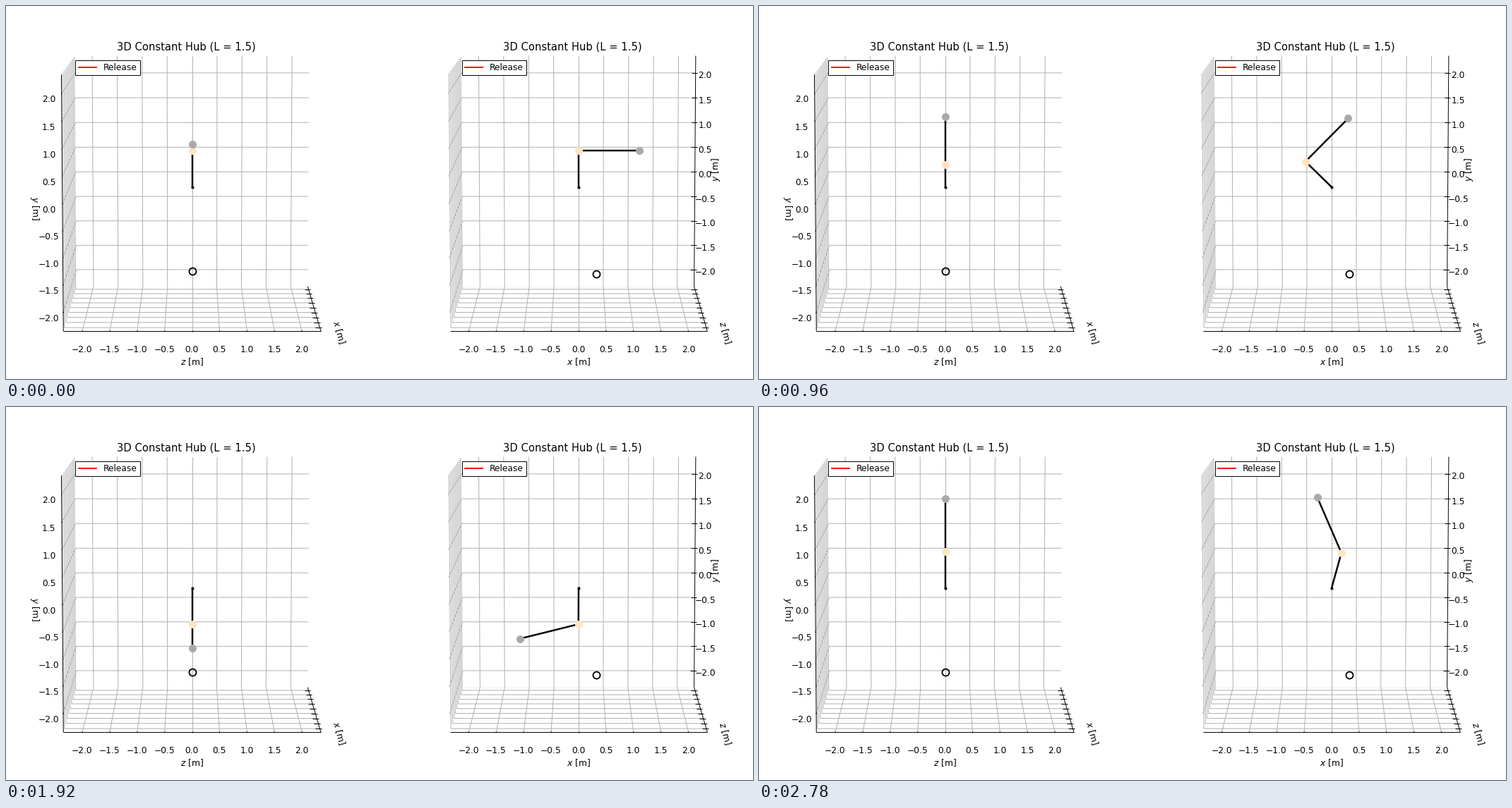
A matplotlib script for the animation above (2800 ms loop, 1058x529 px).

```python
import numpy as np
import matplotlib.pyplot as plt
from matplotlib.animation import FuncAnimation

W, H, DPI = 1058, 529, 72          # at 72 dpi one point is one pixel
PT = 88.17 / 72                    # pixels per design point
STEP, FRAMES = 20, 140

# Camera: perspective view of a cube, slightly from above
ELEV = np.radians(7.5)
DIST, SCALE, CY = 10, 3158, 256.7
LIM, UNIT = 2.34375, 0.23471       # axis limit, world size of one metre
TICKS = np.arange(-2, 2.1, 0.5)

ARM, CLUB = 0.70, 1.16
RELEASE = 1.55
BALL = (0.343, -1.684)

plt.rcParams["font.family"] = "DejaVu Sans"
fig = plt.figure(figsize=(W / DPI, H / DPI), dpi=DPI, facecolor="white")
ax = fig.add_axes([0, 0, 1, 1])
ax.set_xlim(0, W)
ax.set_ylim(H, 0)
ax.axis("off")


def project(cx, h, d, v):
    """Screen position of a point: h right, d towards the viewer, v up."""
    h, d, v = (np.asarray(a, float) * UNIT for a in (h, d, v))
    depth = DIST - d * np.cos(ELEV) - v * np.sin(ELEV)
    rise = v * np.cos(ELEV) - d * np.sin(ELEV)
    return cx + SCALE * h / depth, CY - SCALE * rise / depth


def path(cx, points, color, width, z):
    x, y = project(cx, *np.transpose(points))
    ax.plot(x, y, color=color, lw=width * PT, zorder=z,
            solid_capstyle="butt")


def text(x, y, s, size=10, **kw):
    kw = {"ha": "center", "va": "baseline", **kw}
    ax.text(x, y, s, fontsize=size * PT, color="black", zorder=4, **kw)


def number(v):
    return f"{v:.1f}".replace("-", "\u2212")


def draw_grid(cx):
    for t in TICKS:
        path(cx, [(t, LIM, -LIM), (t, -LIM, -LIM), (t, -LIM, LIM)],
             "#b0b0b0", 0.8, 1)
        path(cx, [(LIM, t, -LIM), (-LIM, t, -LIM), (-LIM, t, LIM)],
             "#b0b0b0", 0.8, 1)
        path(cx, [(-LIM, LIM, t), (-LIM, -LIM, t), (LIM, -LIM, t)],
             "#b0b0b0", 0.8, 1)


def draw_axes(cx, across, into, up_on_left):
    inner, outer = LIM - 0.078, LIM + 0.039
    path(cx, [(-LIM, LIM, -LIM), (LIM, LIM, -LIM)], "black", 0.8, 2)
    path(cx, [(LIM, -LIM, -LIM), (LIM, LIM, -LIM)], "black", 0.8, 2)
    side, near = (-LIM, LIM) if up_on_left else (LIM, -LIM)
    path(cx, [(side, near, -LIM), (side, near, LIM)], "black", 0.8, 2)

    for t in TICKS:
        path(cx, [(t, inner, -LIM), (t, outer, -LIM)], "black", 0.8, 2)
        path(cx, [(inner, t, -LIM), (outer, t, -LIM)], "black", 0.8, 2)
        x, _ = project(cx, t, LIM, -LIM)
        text(x - 0.3, 491.3, number(t))
        _, y = project(cx, side, near, t)
        if up_on_left:
            path(cx, [(side, inner, t), (side, outer, t)], "black", 0.8, 2)
            text(cx - 202.7, y + 11.9, number(t))
        else:
            path(cx, [(inner, near, t), (outer, near, t)], "black", 0.8, 2)
            text(cx + 179.3, y + 7.5, number(t))

    tilted = dict(va="center", rotation_mode="default")
    text(cx - 0.3, 509, f"${across}$ [m]")
    text(cx + 207.5, 462.5, f"${into}$ [m]", rotation=-75, **tilted)
    if up_on_left:
        text(cx - 223, 287, "$y$ [m]", rotation=-89.7, **tilted)
    else:
        text(cx + 195, 231.5, "$y$ [m]", rotation=89.5, **tilted)


def draw_heading(cx):
    text(cx - 8.4, 62.7, "3D Constant Hub (L = 1.5)", size=12)
    left = cx - 165.2
    ax.add_patch(plt.Rectangle((left, 76.5), 91.5, 21.5, fc="white",
                               ec="black", lw=0.8 * PT, zorder=3))
    ax.plot([left + 4.5, left + 29.3], [86.6, 86.6], color="red",
            lw=1.5 * PT, zorder=4)
    text(left + 38.9, 91, "Release", ha="left")


class Panel:
    """One view of the swing; side views look along x instead of z."""

    def __init__(self, cx, along_x):
        self.cx, self.along_x = cx, along_x
        draw_grid(cx)
        if along_x:
            draw_axes(cx, "z", "x", True)
        else:
            path(cx, [(-LIM, -LIM, -LIM), (LIM, -LIM, -LIM)],
                 "#eeeeee", 0.8, 0.5)
            draw_axes(cx, "x", "z", False)
        draw_heading(cx)
        bx, by = self.place(*BALL)
        ax.plot([bx], [by], "o", ms=10, mfc="none", mec="black",
                mew=1.5 * PT, zorder=5)
        self.rod, = ax.plot([], [], color="black", lw=2 * PT, zorder=6)
        self.hub = self.dot("black", 4)
        self.hand = self.dot("bisque", 11)
        self.head = self.dot("darkgray", 11)

    def dot(self, color, size):
        return ax.plot([], [], "o", ms=size, color=color, mew=0,
                       zorder=7)[0]

    def place(self, x, y):
        x, y = np.asarray(x, float), np.asarray(y, float)
        if self.along_x:
            return project(self.cx, 0 * x, -x, y)
        return project(self.cx, x, 0 * x, y)

    def update(self, x, y):
        px, py = self.place(x, y)
        self.rod.set_data(px, py)
        for i, mark in enumerate((self.hub, self.hand, self.head)):
            mark.set_data(px[i:i + 1], py[i:i + 1])
        return [self.rod, self.hub, self.hand, self.head]


def swing(t):
    """Joint positions: steady spin-up, then the wrist lets go."""
    u = max(0.0, t - RELEASE)
    arm = 90 + 49.3 * t**2 + u**2 * (4.78 - 64.2 * u + 33.1 * u**2)
    wrist = 90 - u**2 * (72.6 + 119.0 * u - 88.5 * u**2)
    a, c = np.radians(arm), np.radians(arm - wrist)
    x = np.cumsum([0, ARM * np.cos(a), CLUB * np.cos(c)])
    y = np.cumsum([0, ARM * np.sin(a), CLUB * np.sin(c)])
    return x, y


panels = [Panel(263.6, True), Panel(811.0, False)]


def update(n):
    x, y = swing(n * STEP / 1000)
    return [art for p in panels for art in p.update(x, y)]


anim = FuncAnimation(fig, update, frames=FRAMES, interval=STEP,
                     init_func=lambda: update(0), repeat=True,
                     repeat_delay=0, blit=False)
plt.show()
```
